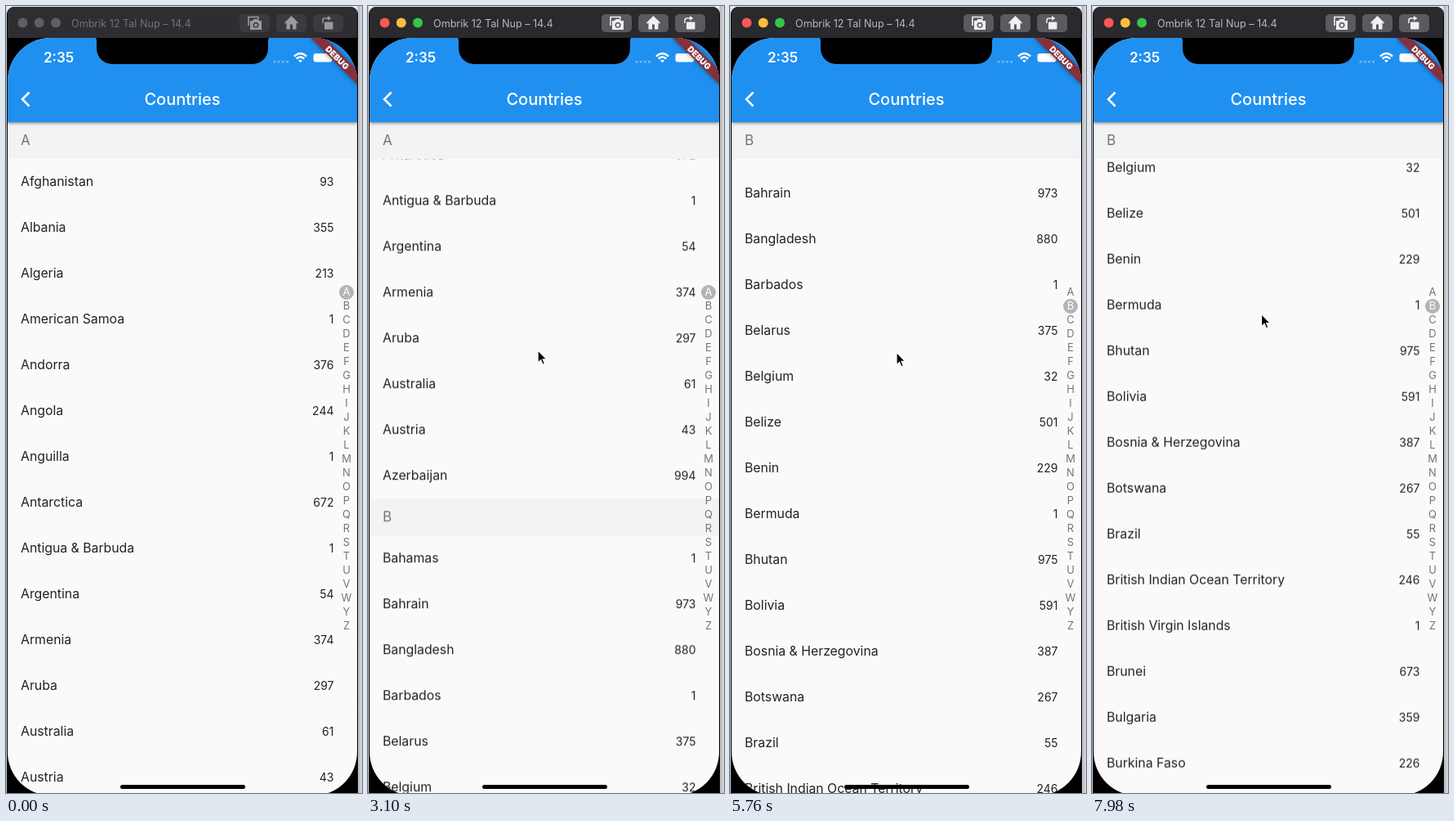
Animation of 436x962 px, one loop 8 s. Source, as an HTML page:

```html
<!DOCTYPE html>
<html lang="en">
<head>
<meta charset="utf-8">
<title>Country list</title>
<style>
html, body { margin: 0; width: 100%; height: 100%; overflow: hidden; background: #ececee; }
#stage { position: relative; width: 436px; height: 962px; overflow: hidden; font-family: Inter, Roboto, sans-serif;
  background: linear-gradient(90deg, #c8c8cb 0 1px, #ececee 1px 430px, #b4b4b8 431px, #dcdcdf 436px); }
#stage div, #stage svg { position: absolute; }
#window { left: 1px; top: 1px; width: 430px; height: 970px; border-radius: 9px 9px 0 0; background: #000; overflow: hidden; }
#bar { left: 1px; top: 0; width: 428px; height: 38px; }
#screen { left: 2px; top: 39px; width: 428px; height: 926px; border-radius: 53px; overflow: hidden; background: #fafafb; }
#view { top: 103px; width: 428px; height: 823px; overflow: hidden; }
#list { width: 428px; will-change: transform; }
#stage .row, #stage .head { position: relative; box-sizing: border-box; width: 428px; padding: 0 28.5px 0 16px; }
#stage .row { height: 56px; line-height: 56px; font-size: 15.8px; color: #222; display: flex; justify-content: space-between; }
.row span:last-child { font-size: 14px; }
#stage .head { height: 45px; line-height: 45px; font-size: 17px; color: #757577; background: #f2f3f4; }
#stage #sticky { position: absolute; top: 0; }
#index { left: 406px; top: 302px; width: 18px; isolation: isolate; }
#index div { position: relative; width: 18px; height: 17px; line-height: 17px; text-align: center; font-size: 13px; color: #767678; }
#index .on { color: #fff; }
#index .on::before { content: ""; position: absolute; z-index: -1; left: 0; top: -.5px; width: 18px; height: 18px; border-radius: 9px; background: #b3b3b8; }
#appbar { width: 428px; height: 103px; background: #2090f0; box-shadow: 0 1px 4px #0008; }
#name { width: 428px; top: 62px; line-height: 26px; text-align: center; font-size: 20px; font-weight: 500; color: #fff; }
#clock { left: 44px; top: 14px; line-height: 21px; font-size: 17px; font-weight: 600; color: #fff; }
#corner { left: 2px; top: 39px; width: 428px; height: 120px; border-radius: 0 53px 0 0; overflow: hidden; }
#banner { left: 388px; top: 28px; width: 80px; height: 12px; transform-origin: 40px -28px; transform: rotate(45deg);
  background: #86303c; box-shadow: 0 0 6px #0007; color: #fff; font-size: 10.2px; line-height: 12px; font-weight: 900; text-align: center; }
#top, #pointer { left: 0; top: 0; }
</style>
</head>
<body>
<div id="stage">
  <div id="window"><div id="bar"></div></div>
  <div id="screen">
    <div id="view"><div id="list"></div><div id="sticky" class="head">A</div></div>
    <div id="index"></div>
    <div id="appbar"><div id="name">Countries</div><div id="clock">2:35</div></div>
  </div>
  <svg id="top" width="436" height="962">
    <g id="lights"><circle cx="20.5" cy="20.5" r="6"/><circle cx="40.7" cy="20.5" r="6"/><circle cx="61" cy="20.5" r="6"/></g>
    <text id="caption" x="80" y="26" font-size="12.6">Ombrik 12 Tal Nup – 14.4</text>
    <g id="buttons">
      <rect x="286" y="10" width="37" height="22" rx="5"/>
      <rect x="331" y="10" width="37" height="22" rx="5"/>
      <rect x="376" y="10" width="37" height="22" rx="5"/>
    </g>
    <g id="icons" fill="currentColor">
      <path d="M297 24V13.5H309V16" fill="none" stroke="currentColor" stroke-width="1.6"/>
      <path fill-rule="evenodd" d="M299 18h3l1.5-2h5l1.5 2h3v11h-14zM306 19.8a3.6 3.6 0 1 0 .01 0zM306 21.4a2 2 0 1 1-.01 0z"/>
      <path fill-rule="evenodd" d="M349.5 12l8.5 8.5-1 1.200-1.500-1.300V28.500H343.500V20.400L342 21.700 341 20.500zM348 22.500v6h3v-6z"/>
      <rect x="390" y="19.5" width="10.5" height="9" rx="1"/>
      <path d="M388 21V17.5Q388 15 390.5 15H395" fill="none" stroke="currentColor" stroke-width="1.5"/>
      <path d="M394 12l4.5 3-4.5 3z"/>
    </g>
    <path d="M110 39H322Q321 40 321 44V52A19 19 0 0 1 302 71H130A19 19 0 0 1 111 52V44Q111 40 110 39Z"/>
    <path d="M28.5 105.5L20 114l8.5 8.5" fill="none" stroke="#fff" stroke-width="2.6"/>
    <path d="M327.5 68.2H346" stroke="#72b7f4" stroke-width="2.6" stroke-dasharray="3 2.2"/>
    <path d="M353 61.5Q360.5 54.5 368 61.5M355.8 64.5Q360.5 60.2 365.2 64.5" fill="none" stroke="#fff" stroke-width="2.4"/>
    <path d="M358 66.6Q360.5 64.8 363 66.6L360.5 69.2z" fill="#fff"/>
    <rect x="376.5" y="58" width="23" height="10.5" rx="3" fill="#fff"/>
    <rect x="140" y="952" width="153" height="5" rx="2.5"/>
  </svg>
  <div id="corner"><div id="banner">DEBUG</div></div>
  <svg id="pointer" width="18" height="24" viewBox="-2 -2 18 24">
    <path d="M0 0V15.5L3.6 12.2 6 17.7 8.5 16.6 6.2 11.2H11Z" stroke="#fff" stroke-width="1.3"/>
  </svg>
</div>
<script>
const $ = id => document.getElementById(id);
const LOOP = 8000, ROW = 56, HEAD = 45;

const sections = {
  A: "Afghanistan 93,Albania 355,Algeria 213,American Samoa 1,Andorra 376,Angola 244,Anguilla 1,Antarctica 672,Antigua & Barbuda 1,Argentina 54,Armenia 374,Aruba 297,Australia 61,Austria 43,Azerbaijan 994",
  B: "Bahamas 1,Bahrain 973,Bangladesh 880,Barbados 1,Belarus 375,Belgium 32,Belize 501,Benin 229,Bermuda 1,Bhutan 975,Bolivia 591,Bosnia & Herzegovina 387,Botswana 267,Brazil 55,British Indian Ocean Territory 246,British Virgin Islands 1,Brunei 673,Bulgaria 359,Burkina Faso 226,Burundi 257"
};

function add(parent, tag, className, text = "") {
  const el = document.createElement(tag);
  el.className = className;
  el.textContent = text;
  parent.append(el);
  return el;
}

for (const [letter, rows] of Object.entries(sections)) {
  add($("list"), "div", "head", letter);
  for (const entry of rows.split(",")) {
    const cut = entry.lastIndexOf(" "), row = add($("list"), "div", "row");
    add(row, "span", "", entry.slice(0, cut));
    add(row, "span", "", entry.slice(cut + 1));
  }
}
const letters = [..."ABCDEFGHIJKLMNOPQRSTUVWYZ"].map(c => add($("index"), "div", "", c));
const startB = HEAD + ROW * sections.A.split(",").length;

const ease = {
  out: p => p * (2 - p),
  both: p => p * p * (3 - 2 * p),
  drag: p => p * (1 + p) / 2
};

// Each drag moves the list with the pointer, then lets it coast until the next touch
const COAST = 500;
const drags = [
  { start: 2050, end: 2455, distance: 174, coast: 346 },
  { start: 4150, end: 4827, distance: 212, coast: 244.5 },
  { start: 7450, end: 7860, distance: 160, coast: 345 }
];

// Time, position, easing used to arrive there
const pointerSteps = [
  [550, [440, 700]], [1080, [230.5, 547], "out"],
  [drags[0].start, [230.5, 547]], [drags[0].end, [208.5, 372.5], "drag"],
  [2800, [208.5, 372.5]], [3600, [207, 525], "both"],
  [drags[1].start, [207, 525]], [drags[1].end, [205.5, 298.5], "drag"],
  [5300, [205.5, 298.5]], [6200, [202.5, 540], "both"],
  [drags[2].start, [202.5, 540]], [drags[2].end, [207.5, 376.5], "drag"]
];

function scrollAt(t) {
  return drags.reduce((sum, { start, end, distance, coast }, i) => {
    const p = Math.min(1, Math.max(0, (t - start) / (end - start)));
    const rest = Math.max(0, Math.min(t, drags[i + 1]?.start ?? LOOP) - end);
    return sum + distance * ease.drag(p) + coast * (1 - Math.exp(-rest / COAST));
  }, 0);
}

function pointerAt(t) {
  const i = pointerSteps.findIndex(s => s[0] > t);
  if (i === 0) return pointerSteps[0][1];
  if (i < 0) return pointerSteps.at(-1)[1];
  const [t0, from] = pointerSteps[i - 1], [t1, to, kind = "out"] = pointerSteps[i];
  const p = ease[kind]((t - t0) / (t1 - t0));
  return from.map((v, k) => v + (to[k] - v) * p);
}

// Three even moments of motion per 140 ms, shown for 100, 20 and 20 ms
function steppedTime(t) {
  const cycle = Math.floor((t - 20) / 140), phase = t - 20 - cycle * 140;
  const third = phase < 100 ? 0 : phase < 120 ? 1 : 2;
  return 20 + (cycle + third / 3) * 140;
}

function setFocus(on) {
  const lights = on ? ["#fc5753", "#fdbc40", "#33c748"] : Array(3).fill("#5f5f63");
  [...$("lights").children].forEach((c, i) => c.setAttribute("fill", lights[i]));
  $("bar").style.background = on ? "#29292e" : "#2d2d32";
  $("caption").setAttribute("fill", on ? "#b9b9bc" : "#737377");
  $("buttons").setAttribute("fill", on ? "#5a5a5f" : "#3a3a3f");
  $("icons").style.color = on ? "#f0f0f2" : "#9a9a9e";
}

function draw(t) {
  const scroll = scrollAt(t), [x, y] = pointerAt(t);
  const inB = scroll >= startB;
  $("list").style.transform = `translateY(${-scroll}px)`;
  $("sticky").textContent = inB ? "B" : "A";
  $("sticky").style.transform = `translateY(${inB ? 0 : Math.min(0, startB - scroll - HEAD)}px)`;
  letters.forEach((el, i) => el.className = i === +inB ? "on" : "");
  setFocus(t >= drags[0].start);
  $("pointer").style.visibility = t < pointerSteps[0][0] ? "hidden" : "visible";
  $("pointer").style.transform = `translate(${x - 2}px, ${y - 2}px)`;
}

function tick() {
  draw(steppedTime(performance.now() % LOOP));
  requestAnimationFrame(tick);
}
tick();
</script>
</body>
</html>
```
